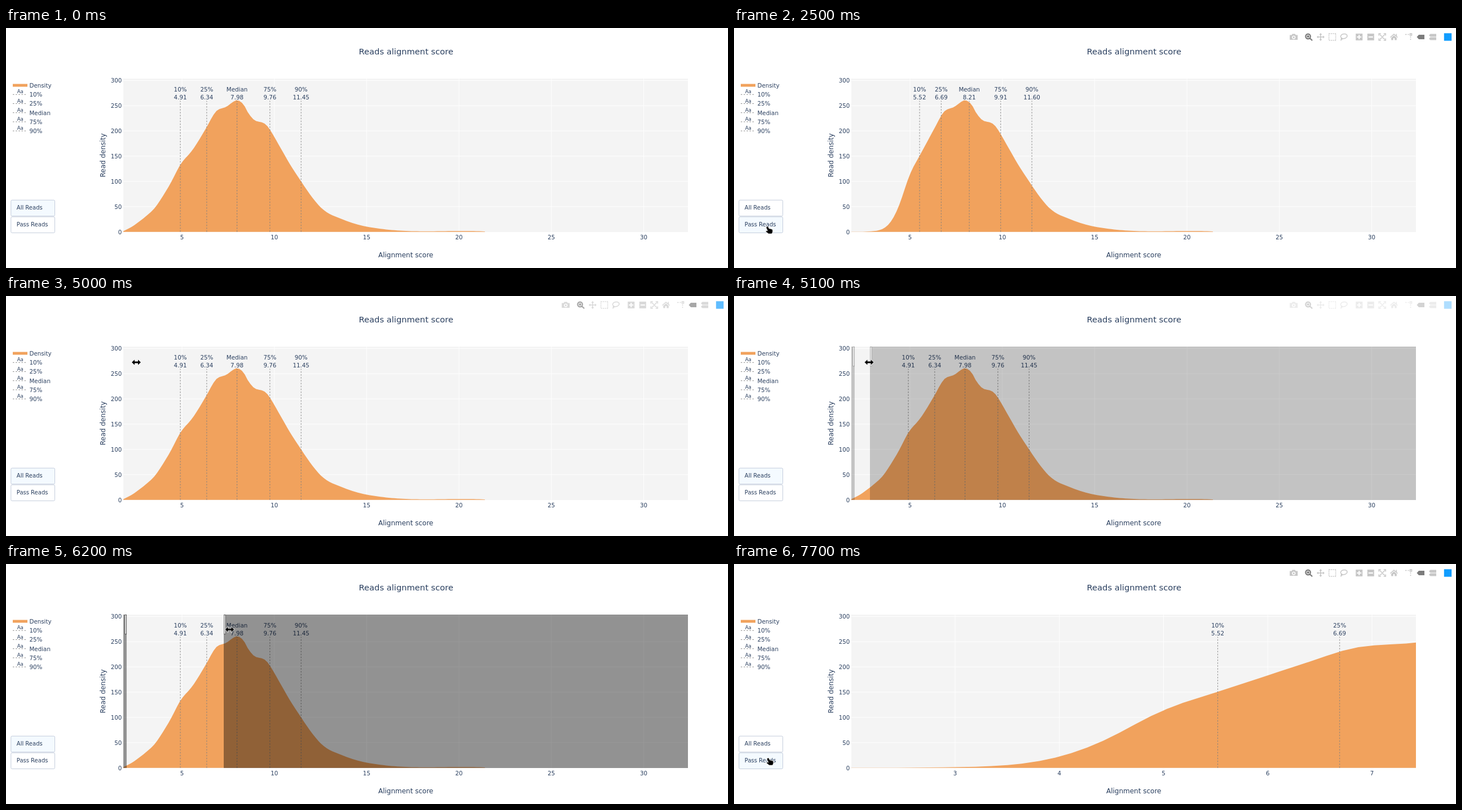
These frames come from a looping animation (1280x427 px, 8000 ms). An HTML page:

```html
<!DOCTYPE html>
<html lang="en">
<head>
<meta charset="utf-8">
<title>Reads alignment score</title>
<style>
  html, body { margin: 0; width: 100%; height: 100%; overflow: hidden; background: #fff; }
  svg { display: block; width: 1280px; height: 427px; }
  text { font: 10.29px "DejaVu Sans", Verdana, sans-serif; fill: #2a3f5f; }
  .mid { text-anchor: middle; }
  .end { text-anchor: end; }
  .title { font-size: 14.7px; }
  .axis { font-size: 12px; }
  .sample { font-size: 8.6px; }
  .button { font-size: 10px; }
  .dash { stroke: #7f7f7f; stroke-width: .9; stroke-dasharray: 2.57 2.57; }
  .grid { stroke: #fff; stroke-width: .9; }
  .area { fill: #f1a25d; }
  .box { stroke: #bec8d9; stroke-width: .9; fill: #f4faff; }
  .handle { fill: #fff; stroke: #444; stroke-width: .9; }
  .pointer { fill: #000; stroke: #fff; stroke-width: 1.6; paint-order: stroke; stroke-linejoin: round; }
  #bar path { fill: #c7c7c7; }
  #bar .line { fill: none; stroke: #c7c7c7; stroke-width: 1.5; }
  #bar .on { fill: #7c7c7c; }
  #bar .line.on { fill: none; stroke: #7c7c7c; stroke-width: 2.2; }
</style>
</head>
<body>
<svg id="stage" viewBox="0 0 1280 427"></svg>
<script>
const LOOP = 8000, STEP = 100;
const LEFT = 208, RIGHT = 1209, TOP = 90, BASE = 362.7;

// Key points of the density curve: score, count
const keys = [
  [1.82, 1], [2.39, 12.3], [3.37, 41], [3.73, 57.5], [4.37, 95.5], [4.86, 130], [5.09, 142],
  [5.46, 157], [5.82, 176], [6.34, 208], [6.74, 234], [6.95, 242], [7.38, 247.5],
  [7.81, 258.7], [8.02, 261], [8.33, 252.5], [8.6, 235], [8.94, 221], [9.43, 215.5],
  [9.73, 204.5], [10.31, 168], [11.05, 122], [12.51, 48.5], [13.74, 24], [15.02, 10],
  [17.13, 1.6], [20.5, 1.5], [21.43, .6]
];
const slope = i => {
  const a = keys[Math.max(i - 1, 0)], b = keys[Math.min(i + 1, keys.length - 1)];
  return (b[1] - a[1]) / (b[0] - a[0]);
};
function allDensity(score) {
  const i = Math.max(1, keys.findIndex(k => k[0] >= score));
  const [x0, y0] = keys[i - 1], [x1, y1] = keys[i];
  const h = x1 - x0, u = (score - x0) / h, v = 1 - u;
  return v * v * ((1 + 2 * u) * y0 + u * h * slope(i - 1)) + u * u * ((3 - 2 * u) * y1 - v * h * slope(i));
}
// Low scores rarely pass the filter
const passDensity = score => allDensity(score) / (1 + Math.exp(2.4 * (4.35 - score)));

const names = ["10%", "25%", "Median", "75%", "90%"];
const allMarks = ["4.91", "6.34", "7.98", "9.76", "11.45"];
const passMarks = ["5.52", "6.69", "8.21", "9.91", "11.60"];

const text = (x, y, s, cls = "", more = "") => `<text x="${x}" y="${y}" class="${cls}" ${more}>${s}</text>`;
const path = (d, cls = "") => `<path d="${d}" class="${cls}"/>`;
const group = (id, body, more = "") => `<g id="${id}" ${more}>${body}</g>`;
const rect = (x, y, w, h, more = "") => `<rect x="${x}" y="${y}" width="${w}" height="${h}" ${more}/>`;

const scoreX = (score, zoomed) => zoomed ? 392 + (score - 3) * 184.75 : 312 + (score - 5) * 32.74;
const countY = n => 362.5 - n * .8967;
const range = (from, to, step) => Array.from({ length: Math.round((to - from) / step) + 1 }, (_, i) => from + i * step);

function area(density, zoomed) {
  const line = range(1.82, 21.43, .153).map(s => `${scoreX(s, zoomed)} ${countY(density(Math.min(s, 21.43)))}`);
  return path(`M${scoreX(1.82, zoomed)} ${BASE}L${line.join("L")}V${BASE}Z`, "area");
}

function chart(id, density, marks, zoomed) {
  let grid = "", labels = "";
  for (const v of zoomed ? range(3, 7, 1) : range(5, 30, 5)) {
    const x = scoreX(v, zoomed);
    grid += path(`M${x} ${TOP}V${BASE}`, "grid");
    labels += text(x, 376, v, "mid");
  }
  for (const n of range(50, 300, 50)) grid += path(`M${LEFT} ${countY(n)}H${RIGHT}`, "grid");
  marks.forEach((v, i) => {
    const x = scoreX(+v, zoomed);
    if (x > RIGHT) return;
    labels += path(`M${x} ${BASE}V129.5`, "dash") + text(x, 112.7, names[i], "mid") + text(x, 126.6, v, "mid");
  });
  return group(id, `<g clip-path="url(#plot)">${grid}${area(density, zoomed)}</g>${labels}`);
}

function legend() {
  let out = rect(12, 99.5, 26, 5, 'fill="#f1a25d"') + text(41.5, 105.8, "Density");
  names.forEach((name, i) => {
    const y = 118.3 + i * 16.2;
    out += path(`M12 ${y}H37`, "dash") + text(25.3, y - 2, "Aa", "mid sample") + text(41.5, y + 3.9, name);
  });
  return out;
}

const button = (id, y, label) =>
  rect(8.8, y, 77.7, 28.4, `id="${id}" rx="2" class="box"`) + text(18.8, y + 17, label, "button");

function toolbar() {
  const icon = (x, d, cls = "") => `<g transform="translate(${x} 16)">${path(d, cls)}</g>`;
  const square = "M-6-6H6V6H-6Z";
  return icon(992.3, "M-7-3.5H-3.5L-2.5-5.5H2.5L3.5-3.5H7V5H-7ZM0-2.6A3.2 3.2 0 1 0 .01-2.6ZM0-1A1.6 1.6 0 1 1-.01-1Z") +
    icon(1018.7, "M-1-5.3A4.3 4.3 0 1 0-.99-5.3ZM2 2L6.5 6.3M-3.2-1H1.2M-1-3.2V1.2", "line on") +
    icon(1040, "M0-7L2.5-4H.8V-.8H4V-2.5L7 0L4 2.5V.8H.8V4H2.5L0 7L-2.5 4H-.8V.8H-4V2.5L-7 0L-4-2.5V-.8H-.8V-4H-2.5Z") +
    `<g stroke-dasharray="2 1.4">${icon(1060.7, square, "line")}</g>` +
    icon(1081, "M-3.5 2C-8-1-4-5.5 1-5.5C7-5.5 7.5 0 3 2C0 3.2-2.5 3-3.5 2C-5.5 2.5-4 4.5-3 4C-1.5 3-5 1-4.5 4L-5 6.5", "line") +
    icon(1108.3, square + "M-1-4V-1H-4V1H-1V4H1V1H4V-1H1V-4Z") +
    icon(1128.8, square + "M-4-1V1H4V-1Z") +
    icon(1149.3, "M-6-2.5V-6H-2.5M2.5-6H6V-2.5M6 2.5V6H2.5M-2.5 6H-6V2.5M-4.5-4.5L4.5 4.5M4.5-4.5L-4.5 4.5", "line") +
    icon(1170, "M0-6L7 .3L6 1.3L0-4L-6 1.3L-7 .3ZM3.5-5.5H5V-1L3.5-2.5ZM0-2.8L4.8 1.5V5.5H1.3V2H-1.3V5.5H-4.8V1.5Z") +
    icon(1196, "M-6-4.5H-3.5M-1.5-4.5H.5M3.5-6H5.5V-3H2.5V-6ZM3.5-1V1M3.5 3V5", "line") +
    icon(1217.5, "M-7 0L-3.5-4H6.5V4H-3.5Z", "on") +
    icon(1238.5, "M-6.5-3L-4-5.5H6.5V-.6H-4ZM-6.5 3L-4 .6H6.5V5.5H-4Z") +
    rect(1258.8, 9.3, 13.4, 13.4, 'fill="#119dff"');
}

const shade = (x, w) => rect(x, TOP, w, 273, 'fill="#000" opacity=".4"');
const handle = x => rect(x, 90.4, 2.6, 34.4, 'class="handle"');

document.getElementById("stage").innerHTML = `
  <clipPath id="plot">${rect(LEFT, TOP, RIGHT - LEFT, 273)}</clipPath>
  ${rect(LEFT, TOP, RIGHT - LEFT, 273, 'fill="#f4f4f4"')}` +
  chart("all", allDensity, allMarks, false) +
  chart("pass", passDensity, passMarks, false) +
  chart("allZoom", allDensity, allMarks, true) +
  chart("passZoom", passDensity, passMarks, true) +
  range(0, 300, 50).map(n => text(205.3, countY(n) + 4, n, "end")).join("") +
  text(709.3, 46.7, "Reads alignment score", "mid title") +
  text(708.7, 407.5, "Alignment score", "mid axis") +
  text(0, 0, "Read density", "mid axis", 'transform="translate(176 226.5) rotate(-90)"') +
  legend() + button("allButton", 306.2, "All Reads") + button("passButton", 336, "Pass Reads") +
  group("bar", toolbar()) +
  group("select", shade(LEFT, 5.9) + handle(210.9) +
    group("edge", shade(0, 1001) + handle(.6)), 'clip-path="url(#plot)"') +
  group("cursor",
    group("hand", path("M2.2 1C3.2-.3 4.6.1 5.2 1.5L6.8 4.6C7.6 4 8.4 4.2 8.8 4.8C9.6 4.3 10.4 4.6 10.8 5.3C11.8 5 12.6 5.7 12.7 6.8V10L11.4 12.8H5.6L1.6 9.4C.9 8.6 1.8 7.5 3 8L4.6 8.6L2 2.4Z")) +
    group("arrow", path("M0 0V14L3.2 11L5.4 16L7.8 15L5.6 10.2H10.2Z")) +
    group("resize", path("M-8 0L-3-4.8V-1.5H3V-4.8L8 0L3 4.8V1.5H-3V4.8Z")),
    'class="pointer"');

const sheet = document.createElement("style");
document.head.append(sheet);

// Held changes: each stop is [time in ms, value]
function track(id, prop, stops) {
  const frames = stops.map(([t, v]) => `${t / LOOP * 100}%{${prop}:${v}}`).join("");
  const last = stops[stops.length - 1][1];
  sheet.textContent += `@keyframes ${id}-k{${frames}100%{${prop}:${last}}}
    #${id}{animation:${id}-k ${LOOP}ms step-end infinite}\n`;
}
// A movement seen once per STEP; value gets the eased progress from 0 to 1
const glide = (from, to, value) => range(from, to, STEP).map(t => {
  const u = to > from ? (t - from) / (to - from) : 0;
  return [t, value((u + u * u * (3 - 2 * u)) / 2, u)];
});
const fade = (t, from, to, n = 3) =>
  range(1, n, 1).map(i => [t + (i - 1) * STEP, from + (to - from) * i / n]);
const place = (x, y) => `translate(${x}px,${y}px)`;
const toggle = (id, prop, first, second, ...times) =>
  track(id, prop, [[0, first], ...times.map((t, i) => [t, i % 2 ? first : second])]);

toggle("all", "visibility", "visible", "hidden", 2400, 3600, 6400);
toggle("pass", "visibility", "hidden", "visible", 2400, 3600);
toggle("allZoom", "visibility", "hidden", "visible", 6400, 7700);
toggle("passZoom", "visibility", "hidden", "visible", 7700);
toggle("allButton", "fill", "#f4faff", "#fff", 2400, 3600, 7700);
toggle("passButton", "fill", "#fff", "#f4faff", 1200, 3600, 7400);

track("bar", "opacity", [[0, 0], ...fade(500, 0, 1), ...fade(5000, 1, 0), ...fade(6400, 0, 1)]);
track("select", "opacity", [[0, 0], ...fade(5100, 0, 1, 2), [6400, 0]]);
track("edge", "transform", [[0, place(233, 0)], ...glide(5000, 6200, e => place(233 + 152.7 * e, 0))]);

// Cursor legs: shape, start and end time, start and end point, downward bow
const legs = [
  ["arrow", 500, 1000, 190, 345, 57, 369, 0],
  ["hand", 1200, 1400, 57, 362, 55.5, 353, 0],
  ["hand", 3600, 3600, 62.3, 325.5, 62.3, 325.5, 0],
  ["hand", 3900, 4000, 65, 329, 67, 331, 0],
  ["arrow", 4200, 4400, 105, 270, 198, 136, 0],
  ["resize", 4600, 4600, 226, 118, 226, 118, 0],
  ["resize", 5000, 6200, 231, 118, 396.5, 116.5, 0],
  ["resize", 6400, 6700, 394, 121, 350, 231, 0],
  ["resize", 6900, 6900, 300, 300, 300, 300, 0],
  ["arrow", 7000, 7300, 215, 366, 68, 372, 30],
  ["hand", 7400, 7400, 56.8, 345, 56.8, 345, 0]
];
track("cursor", "transform", [[0, place(0, 0)], ...legs.flatMap(([, from, to, x0, y0, x1, y1, bow]) =>
  glide(from, to, (e, u) => place(x0 + (x1 - x0) * e, y0 + (y1 - y0) * e + bow * Math.sin(Math.PI * u))))]);
for (const kind of ["hand", "arrow", "resize"])
  track(kind, "visibility", [[0, "hidden"], ...legs.map(l => [l[1], l[0] === kind ? "visible" : "hidden"])]);
</script>
</body>
</html>
```
